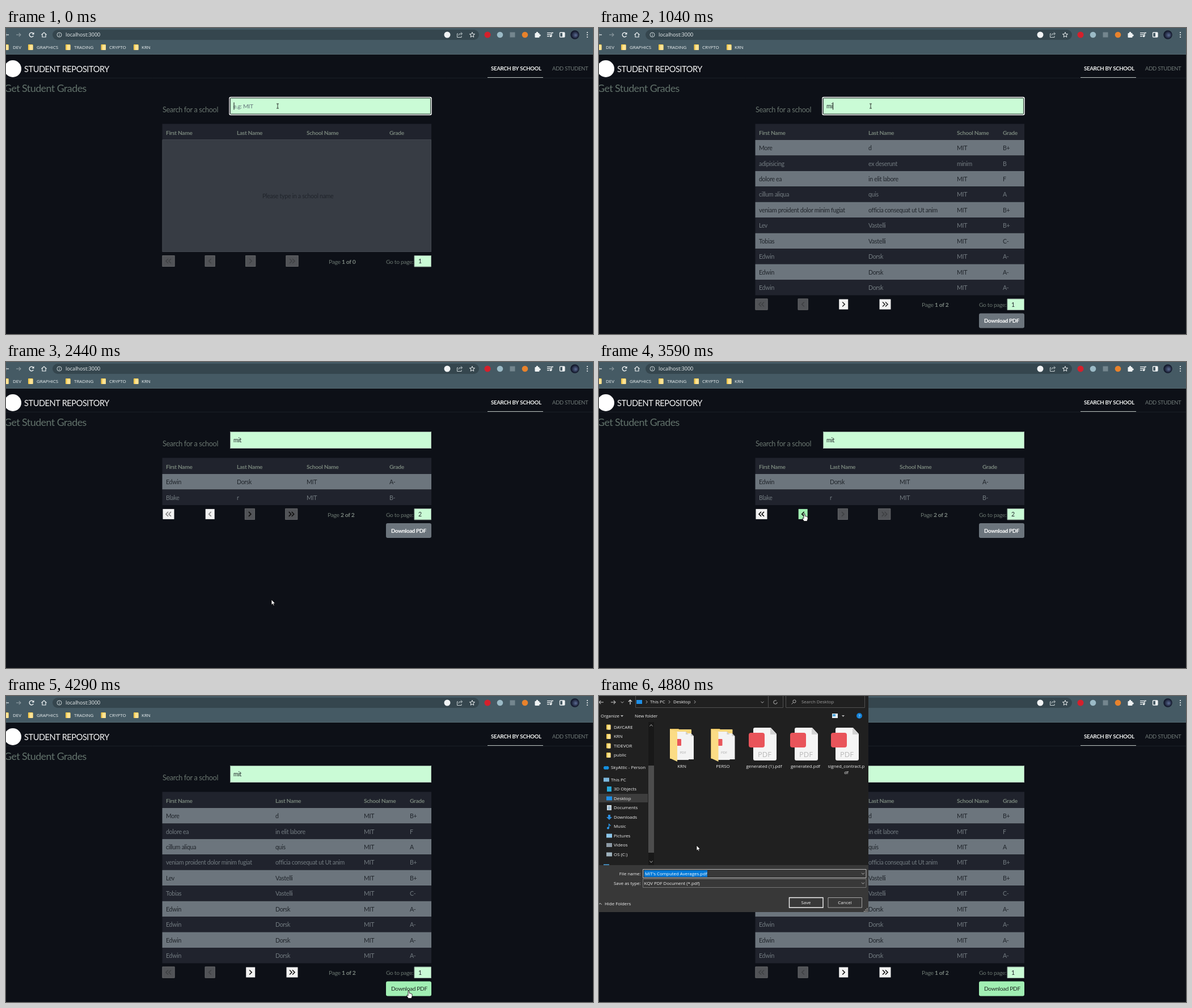
Animation, 1035 px wide and 541 px high, one loop 5 s. Source, as an HTML page with a canvas:

```html
<!DOCTYPE html>
<html lang="en">
<head>
<meta charset="utf-8">
<title>Student Repository</title>
<style>
html, body { margin: 0; width: 100%; height: 100%; overflow: hidden; background: #0d1017; }
canvas { display: block; }
</style>
</head>
<body>
<canvas id="stage" width="1035" height="541"></canvas>
<script>
const ctx = document.getElementById('stage').getContext('2d');
const LOOP = 5000;
const BG = '#0d1017', MUTED = '#69756f', MINT = '#cafbd6', HOVER = '#a1efb3';
const INK_OFF = '#3e4043', INK_MID = '#8a8a8a', INK_ON = '#101010';

// ---------- helpers ----------
function rect(x, y, w, h, fill, r = 0) {
  ctx.fillStyle = fill;
  ctx.beginPath();
  ctx.roundRect(x, y, w, h, r);
  ctx.fill();
}
function frame(x, y, w, h, color, r = 0, lw = 1) {
  ctx.strokeStyle = color;
  ctx.lineWidth = lw;
  ctx.beginPath();
  ctx.roundRect(x, y, w, h, r);
  ctx.stroke();
}
function disc(x, y, r, fill) {
  ctx.fillStyle = fill;
  ctx.beginPath();
  ctx.arc(x, y, r, 0, 7);
  ctx.fill();
}
function ring(x, y, r, color, lw = 1, from = 0, to = 2 * Math.PI) {
  ctx.strokeStyle = color;
  ctx.lineWidth = lw;
  ctx.beginPath();
  ctx.arc(x, y, r, from, to);
  ctx.stroke();
}
function line(points, color, lw = 1) {
  ctx.strokeStyle = color;
  ctx.lineWidth = lw;
  ctx.beginPath();
  points.forEach(([x, y]) => ctx.lineTo(x, y));
  ctx.stroke();
}
function poly(points, fill, edge) {
  ctx.fillStyle = fill;
  ctx.beginPath();
  points.forEach(([x, y]) => ctx.lineTo(x, y));
  ctx.closePath();
  ctx.fill();
  if (edge) { ctx.strokeStyle = edge; ctx.lineWidth = 0.8; ctx.stroke(); }
}
// y is the middle of the capitals
function write(str, x, y, size, color, align) {
  ctx.textAlign = align;
  ctx.fillStyle = color;
  ctx.fillText(str, x, y + size * 0.355);
}
function web(str, x, y, size, color, weight = 400) {
  ctx.font = `${weight} ${size}px Lato, sans-serif`;
  ctx.letterSpacing = `${-0.031 * size}px`;
  write(str, x, y, size, color, 'left');
}
function ui(str, x, y, color = '#f0f0f0', size = 7.9, align = 'left') {
  ctx.font = `${size}px "Open Sans", sans-serif`;
  ctx.letterSpacing = '0px';
  write(str, x, y, size, color, align);
}
function chevron(x, y, dx, dy, color, lw = 1) {
  const pts = dx ? [[x - dx / 2, y - dy], [x + dx / 2, y], [x - dx / 2, y + dy]]
                 : [[x - 2.5, y - dy / 2], [x, y + dy / 2], [x + 2.5, y - dy / 2]];
  line(pts, color, lw);
}
function arrow(x, y, dx, dy, color) {
  line([[x - dx, y - dy], [x + dx, y + dy]], color, 1.2);
  const px = x + dx, py = y + dy, k = 0.8;
  line([[px - k * (dx + dy), py - k * (dy + dx)], [px, py],
        [px - k * (dx - dy), py - k * (dy - dx)]], color, 1.2);
}

// ---------- data ----------
const STUDENTS = [
  ['More', 'd', 'MIT', 'B+'],
  ['aute', 'dolor anim', 'labore consectetur dolore|ullamco', 'A'],
  ['adipisicing', 'ex deserunt', 'minim', 'B'],
  ['dolore ea', 'in elit labore', 'MIT', 'F'],
  ['cillum aliqua', 'quis', 'MIT', 'A'],
  ['veniam proident dolor minim|fugiat', 'officia consequat ut Ut|anim', 'MIT', 'B+'],
  ['Lev', 'Vastelli', 'MIT', 'B+'],
  ['Tobias', 'Vastelli', 'MIT', 'C-'],
  ...Array(5).fill(['Edwin', 'Dorsk', 'MIT', 'A-']),
  ['Blake', 'r', 'MIT', 'B-']
];
const HEADS = ['First Name', 'Last Name', 'School Name', 'Grade'];

function rowsFor(query, page) {
  if (!query) return [];
  const found = STUDENTS.filter(s => s[2].toLowerCase().includes(query));
  return found.slice(page * 10 - 10, page * 10);
}
function columnsFor(query, page) {
  if (!query || page === 2) return [282, 407, 530, 676];
  return query === 'm' ? [282, 439, 567, 719] : [282, 475, 631, 712];
}

// ---------- timeline: each step changes part of the state ----------
const STEPS = [
  [0, { text: '', query: '', page: 1, focus: true, caret: true, cursor: 'beam', x: 479, y: 138,
        prevOn: false, prevInk: INK_OFF, nextOn: false, nextInk: INK_OFF, hover: '', dialog: 0 }],
  [230, { text: 'm' }],
  [350, { query: 'm', warm: true }],
  [580, { warm: false, nextOn: true, nextInk: INK_MID }],
  [810, { text: 'mi', nextInk: INK_ON }],
  [1040, { query: 'mi', nextInk: '#2a2a2a' }],
  [1280, { text: 'mit', nextInk: INK_ON }],
  [1500, { query: 'mit', x: 493, y: 130 }],
  [1730, { caret: false, cursor: 'hand', x: 431, y: 488, hover: 'next' }],
  [2440, { page: 2, focus: false, cursor: 'arrow', x: 468, y: 420, hover: '',
           prevOn: true, prevInk: INK_MID, nextOn: false, nextInk: INK_ON }],
  [2670, { x: 443, y: 286, prevInk: '#555', nextInk: '#26272a' }],
  [2900, { x: 403, y: 271, prevInk: '#2a2a2a', nextInk: INK_OFF }],
  [3130, { cursor: 'hand', x: 364, y: 268, prevInk: INK_ON }],
  [3360, { hover: 'prev' }],
  [3590, { x: 362, y: 268 }],
  [3820, { page: 1, hover: '', prevOn: false, nextOn: true, nextInk: INK_MID }],
  [4050, { cursor: 'arrow', x: 374, y: 283, prevInk: '#26272a', nextInk: '#2a2a2a' }],
  [4290, { cursor: 'hand', x: 710, y: 521, hover: 'pdf', prevInk: INK_OFF, nextInk: INK_ON }],
  [4530, { dialog: 1 }],
  [4650, { dialog: 2, cursor: 'arrow', x: 530, y: 450 }],
  [4760, { x: 320, y: 350 }],
  [4880, { x: 172, y: 264 }]
];
function stateAt(t) {
  return Object.assign({}, ...STEPS.filter(s => s[0] <= t).map(s => s[1]));
}

// ---------- browser bar ----------
function folder(x, y, w, h) {
  rect(x, y, w, h, '#f2c84f', 1);
  rect(x + w * 0.3, y + 1, w * 0.7, h - 1, '#ffe394', 1);
}
function drawBrowser() {
  const white = '#eef2f3';
  rect(0, 0, 1035, 47, '#455a64');
  rect(82, 3, 752, 18, '#35464e', 9);
  line([[0, 46.5], [1035, 46.5]], '#55686f');
  arrow(1, 12, -4, 0, white);
  arrow(22, 12, 4, 0, '#8c9aa0');
  ring(45, 12, 3.8, white, 1.4, 0.5, 5.6);
  poly([[49.5, 7.5], [49.5, 11.5], [45.5, 11.5]], white);
  line([[62.5, 12], [67, 8], [71.5, 12]], white, 1.2);
  line([[64, 11], [64, 16], [70, 16], [70, 11]], white, 1.2);
  ring(94, 12, 4, '#c9d2d5', 1);
  rect(93.5, 11.5, 1, 3, '#c9d2d5');
  rect(93.5, 9.5, 1, 1, '#c9d2d5');
  ui('localhost:3000', 105, 12, white, 9.1);

  disc(778, 12, 5.5, '#f1f3f4');
  line([[797, 10], [795.5, 10], [795.5, 16.5], [803, 16.5], [803, 14]], '#c9d2d5');
  line([[798, 13.5], [799, 10.5], [804, 10]], '#c9d2d5');
  line([[802, 7.5], [804.5, 10], [802, 12.5]], '#c9d2d5');
  const star = Array.from({ length: 11 }, (_, i) => {
    const r = i % 2 ? 2.1 : 4.8, a = i * Math.PI / 5 - Math.PI / 2;
    return [822 + r * Math.cos(a), 12.3 + r * Math.sin(a)];
  });
  line(star, white);
  disc(849, 12, 5.5, '#d5202c');
  disc(871, 12, 5.3, '#9bbac6');
  rect(888.5, 7.5, 9, 9, '#74868e');
  disc(915, 12, 5.3, '#e8822c');
  rect(932.5, 9, 8, 8, white, 1);
  disc(936.5, 8.5, 1.8, white);
  disc(941, 13, 1.8, white);
  [8, 11, 14].forEach((y, i) => rect(954, y, i === 2 ? 4 : 7, 1.3, white));
  disc(960.5, 14.5, 1.8, white);
  line([[962, 14.5], [962, 8.5], [965, 8.5]], white, 1.3);
  frame(976.5, 8, 8.5, 8, white, 1, 1.3);
  rect(981, 8, 4, 8, white);
  const glow = ctx.createRadialGradient(1005, 13, 0, 1003, 12, 8);
  glow.addColorStop(0, '#5d6c95');
  glow.addColorStop(1, '#080c1c');
  disc(1003, 12, 7.7, glow);
  [8, 12, 16].forEach(y => disc(1025, y, 1.1, white));

  [['DEV', 12, -4], ['GRAPHICS', 54, 39], ['TRADING', 120, 105], ['CRYPTO', 182, 167.5], ['KRN', 239, 225]]
    .forEach(([name, x, fx]) => {
      folder(fx, 29, 8.5, 10);
      ui(name, x, 34, white, 8);
    });
}

// ---------- page ----------
function drawHeader() {
  disc(12, 72, 15, '#fff');
  web('STUDENT REPOSITORY', 32, 72.5, 14.6, '#f4f4f4');
  web('SEARCH BY SCHOOL', 855, 71.5, 9.6, '#f0f2f1', 700);
  web('ADD STUDENT', 963, 71.5, 9.5, '#727c7a');
  line([[0, 88.5], [1035, 88.5]], '#1b1f27');
  rect(849, 87, 98, 1, '#b9c1bd');
  web('Get Student Grades', -3, 106.5, 17.9, '#62726b');
}
function drawSearch(s) {
  web('Search for a school', 276, 144, 12.7, MUTED);
  rect(395, 123, 355, 30, MINT);
  if (s.focus) {
    frame(394, 122.5, 356, 31, '#fff', 2, 1.4);
    frame(395.3, 123.8, 353.4, 28.4, '#15181c', 1, 1);
  } else {
    line([[395.5, 153], [395.5, 123.5], [750, 123.5]], '#84978b');
    line([[395, 152.5], [749.5, 152.5], [749.5, 123]], '#a9bdaf');
  }
  if (s.text) web(s.text, 401, 138.5, 10.6, '#20252a');
  else web('e.g: MIT', 401, 138.5, 10.4, '#64757b');
  if (s.focus && s.caret) {
    const w = s.text ? ctx.measureText(s.text).width : 0;
    rect(401.5 + w, 131.5, 1, 13, '#111');
  }
}
function drawTable(s) {
  const cols = columnsFor(s.query, s.page);
  rect(275.5, 169.5, 474.5, 28.5, '#20232d');
  HEADS.forEach((h, i) => web(h, cols[i], 185, 10.2, '#76837a', 700));
  const rows = rowsFor(s.query, s.page);
  if (!rows.length) {
    rect(275.5, 198, 474.5, 198, '#373c44');
    frame(276, 197.5, 473.5, 198, '#42474f');
    web('Please type in a school name', 452, 297.5, 10.7, '#20242b');
    return 396;
  }
  let y = 198;
  rows.forEach((row, n) => {
    const cells = row.map(c => s.query === 'm' ? c.split('|') : [c.replace('|', ' ')]);
    const tall = cells.some(c => c.length > 1);
    const h = tall ? 44 : 27.45;
    rect(275.5, y, 474.5, h, n % 2 ? '#20232d' : '#6c757d');
    const ink = n % 2 ? '#727b80' : '#20252b';
    cells.forEach((parts, i) => parts.forEach((part, k) =>
      web(part, cols[i], y + h / 2 + 0.6 + (k - (parts.length - 1) / 2) * 16.5, 10.6, ink)));
    y += h;
  });
  return y;
}
function pageButton(x, y, dir, count, on, ink, hover, warm) {
  const w = count === 2 ? 22 : 18;
  if (on) rect(x - w / 2 + 1, y - 9, w - 2, 18, hover ? HOVER : '#f2f2f2');
  else {
    rect(x - w / 2, y - 10, w, 20, warm ? '#66696c' : '#515357');
    frame(x - w / 2 + 0.5, y - 9.5, w - 1, 19, warm ? '#7a7c7e' : '#626467');
  }
  const first = count === 2 ? -2.5 : 0;
  for (let i = 0; i < count; i++) chevron(x + first + i * 5, y, 4 * dir, 4, ink, 1.6);
}
function drawFooter(s, bottom) {
  const y = bottom + 16, last = s.page === 2, dx = last ? -1.3 : 0;
  pageButton(286.5, y, -1, 2, s.prevOn, s.prevInk);
  pageButton(359.7, y, -1, 1, s.prevOn, s.prevInk, s.hover === 'prev');
  pageButton(431.2 + dx, y, 1, 1, s.nextOn, s.nextInk, s.hover === 'next', s.warm);
  pageButton(504.5 + dx, y, 1, 2, s.nextOn, s.nextInk, false, s.warm);
  const px = last ? 567 : 569;
  web('Page', px, y + 1, 10.4, MUTED);
  web(`${s.page} of ${s.query ? 2 : 0}`, px + 23, y + 1, 10.3, '#7c8780', 700);
  web('Go to page:', 670, y + 1, 10.2, MUTED);
  rect(720, y - 9.5, 30, 19.5, MINT);
  frame(720, y - 9.5, 29.5, 19.5, '#93a69a');
  web(String(s.page), 727, y + 0.7, 10.6, '#20252a');
  if (!s.query) return;
  const hot = s.hover === 'pdf';
  rect(670, bottom + 32, 80, 26, hot ? HOVER : '#6c757d', 3);
  web('Download PDF', 679, bottom + 45.3, hot ? 10.1 : 9.7, hot ? '#1f2a24' : '#fff', hot ? 400 : 700);
}

// ---------- save dialog ----------
const PLACES = [
  ['SkyAttic - Person', 21, 126, '#1490df'], ['This PC', 21, 148, '#7db8dc'],
  ['3D Objects', 26, 164.5, '#27a8d8'], ['Desktop', 26, 181, '#1e90e8'],
  ['Documents', 26, 197.5, '#d5dde2'], ['Downloads', 26, 214, '#2d8fe0'],
  ['Music', 26, 230.5, '#2b9cf0'], ['Pictures', 26, 247, '#8cc6ea'],
  ['Videos', 26, 263.5, '#8d9aa5'], ['OS (C:)', 26, 280, '#9fb2bd'],
  ['Network', 21, 301, '#4aa3dd']
];
function sheet(x, y, w, h, fold) {
  poly([[x, y], [x + w - fold, y], [x + w, y + fold], [x + w, y + h], [x, y + h]], '#f3f3f3');
  poly([[x + w - fold, y], [x + w, y + fold], [x + w - fold, y + fold]], '#cfcfcf');
}
function bigFolder(x, name) {
  rect(x, 58, 16, 53, '#e9bd52', 1);
  rect(x + 4, 59, 34, 50, '#f7d67c', 1);
  sheet(x + 21, 66, 21, 46, 5);
  sheet(x + 12, 63, 21, 50, 5);
  rect(x + 12, 76, 8, 12, '#e9555b', 1);
  ui('PDF', x + 23, 100, '#aaa', 6, 'center');
  poly([[x, 58], [x + 13, 64], [x + 13, 116], [x, 110]], '#fbdc85');
  ui(name, x + 21, 124, '#f0f0f0', 7.9, 'center');
}
function pdfFile(x, lines) {
  rect(x - 19, 56, 41, 58, '#f5f5f5', 3);
  poly([[x + 11, 55], [x + 23, 55], [x + 23, 68]], '#202020');
  poly([[x + 11, 56], [x + 22, 68], [x + 11, 68]], '#d2d2d2');
  rect(x - 27, 65, 28, 26, '#e9545a', 4);
  ui('PDF', x + 1, 103, '#b9b9b9', 13, 'center');
  lines.forEach((l, i) => ui(l, x, 124 + i * 11, '#f0f0f0', 7.9, 'center'));
}
function drawPlaces() {
  ctx.save();
  ctx.beginPath();
  ctx.rect(0, 46, 86, 253);
  ctx.clip();
  rect(0, 173, 86, 15, '#3d3d3d');
  ['DAYCARE', 'KRN', 'TIDEVOR', 'public'].forEach((name, i) => {
    const y = 55 + i * 16.5;
    folder(13, y - 4.5, 7.5, 9);
    ui(name, 26, y);
  });
  PLACES.forEach(([name, x, y, color], i) => {
    if (i === 0) {
      disc(11, y + 1, 3, color);
      disc(14.5, y + 1, 3, color);
    } else if (name === 'Music') {
      disc(16, y + 3, 2, color);
      line([[17.5, y + 3], [17.5, y - 4], [20.5, y - 1]], color, 1.2);
    } else if (name === 'Downloads') {
      rect(16, y - 4, 4, 4, color);
      poly([[13, y], [23, y], [18, y + 5]], color);
    } else if (name === 'Documents' || name === '3D Objects') {
      rect(14, y - 4.5, 8, 9, color);
      if (name === 'Documents') [-2, 0, 2].forEach(d => rect(15.5, y + d, 5, 0.8, '#3f83b5'));
    } else {
      rect(x - 13, y - 3.5, 10, 7, color);
    }
    ui(name, x, y);
  });
  ctx.restore();
  rect(87, 46, 10, 253, '#181818');
  rect(87, 123, 10, 154, '#4d4d4d');
  chevron(92, 52, 0, -3, '#aaa');
  chevron(92, 293, 0, 3, '#aaa');
}
function drawDialog(stage) {
  rect(0, 0, 475, 382, '#202020');
  rect(0, 299, 475, 83, '#383838');
  const grey = '#b5b5b5';
  arrow(4, 11, -4, 0, grey);
  arrow(25, 11, 4, 0, grey);
  chevron(41, 11, 0, 2.5, grey);
  arrow(55, 11, 0, -4, '#eee');
  frame(64.5, -2, 234, 22.5, '#505050');
  line([[298.5, 20.5], [324.5, 20.5], [324.5, 0]], '#505050');
  rect(66, 7, 10, 7, '#1e90e8');
  chevron(84, 10.5, 2.5, 2.5, grey);
  ui('This PC', 90, 10.5);
  chevron(124, 10.5, 2.5, 2.5, grey);
  ui('Desktop', 131, 10.5);
  chevron(169, 10.5, 2.5, 2.5, grey);
  chevron(288, 11, 0, 2.5, grey);
  ring(311, 11, 3.2, grey, 1, 0, 5.3);
  frame(329.5, -2, 139, 22.5, '#505050');
  ring(344.5, 9.5, 2.6, grey);
  line([[342.5, 11.5], [339.5, 14.5]], grey);
  ui('Search Desktop', 357, 10.5, '#9c9c9c');
  ui('Organize', 3, 35.5);
  poly([[38, 34], [43, 34], [40.5, 37]], grey);
  ui('New folder', 63, 35.5);
  rect(411, 31, 10, 8, '#e4edf2');
  rect(412, 32, 5, 4, '#4ea6dc');
  poly([[428, 34], [433, 34], [430.5, 37]], grey);
  disc(459, 35, 5, '#1482d8');
  ui('?', 459, 35, '#fff', 7.5, 'center');

  if (stage > 1) {
    drawPlaces();
    bigFolder(125, 'KRN');
    bigFolder(197.5, 'PERSO');
    pdfFile(291, ['generated (1).pdf']);
    pdfFile(364, ['generated.pdf']);
    pdfFile(436, ['signed_contract.p', 'df']);
  }

  ui('File name:', 73.5, 314.5, '#f0f0f0', 7.9, 'right');
  ui('Save as type:', 73.5, 331.5, '#f0f0f0', 7.9, 'right');
  frame(77.5, 306.5, 393.5, 15, '#b8b8b8');
  frame(77.5, 323.5, 393.5, 15, '#757575');
  rect(79.5, 308, 111.5, 12, '#0078d7');
  ui("MIT's Computed Averages.pdf", 81, 314, '#fff');
  ui('KQV PDF Document (*.pdf)', 79.5, 331.5);
  chevron(465.5, 314, 0, 2.5, grey);
  chevron(465.5, 331, 0, 2.5, grey);
  chevron(2, 367.5, 0, -2.5, '#ddd');
  ui('Hide Folders', 10, 367.5);
  frame(335.5, 356.5, 59.5, 17.5, '#f4f4f4', 0, 1.4);
  ui('Save', 365, 365.5, '#f0f0f0', 7.9, 'center');
  frame(404, 356.5, 59.5, 17.5, '#a5a5a5');
  ui('Cancel', 433.5, 365.5, '#f0f0f0', 7.9, 'center');
  for (let i = 0; i < 3; i++)
    for (let k = 0; k <= i; k++) rect(472 - k * 2.5, 375 + i * 2.5, 1.4, 1.4, '#c8c8c8');
}

// ---------- pointer ----------
function drawCursor({ cursor, x, y }) {
  ctx.save();
  ctx.translate(x, y);
  if (cursor === 'beam') {
    line([[-2, -4], [2, -4]], '#2c332f');
    line([[0, -4], [0, 4]], '#2c332f');
    line([[-2, 4], [2, 4]], '#2c332f');
  } else if (cursor === 'arrow') {
    poly([[0, 0], [0, 9.5], [2.2, 7.5], [3.7, 11], [5.2, 10.3], [3.8, 7], [6.6, 7]], '#fff', '#000');
  } else {
    poly([[-1, 0.5], [0, 0], [1, 0.5], [1.2, 4.5], [4, 5], [6, 6], [6.2, 9.5], [4.8, 13.5],
          [-0.5, 13.5], [-3.5, 9], [-3, 7.6], [-1, 8.8]], '#fff', '#000');
  }
  ctx.restore();
}

function render(now) {
  const s = stateAt(now % LOOP);
  rect(0, 0, 1035, 541, BG);
  drawBrowser();
  drawHeader();
  drawSearch(s);
  drawFooter(s, drawTable(s));
  if (s.dialog) drawDialog(s.dialog);
  drawCursor(s);
  requestAnimationFrame(render);
}
render(0);
</script>
</body>
</html>
```
